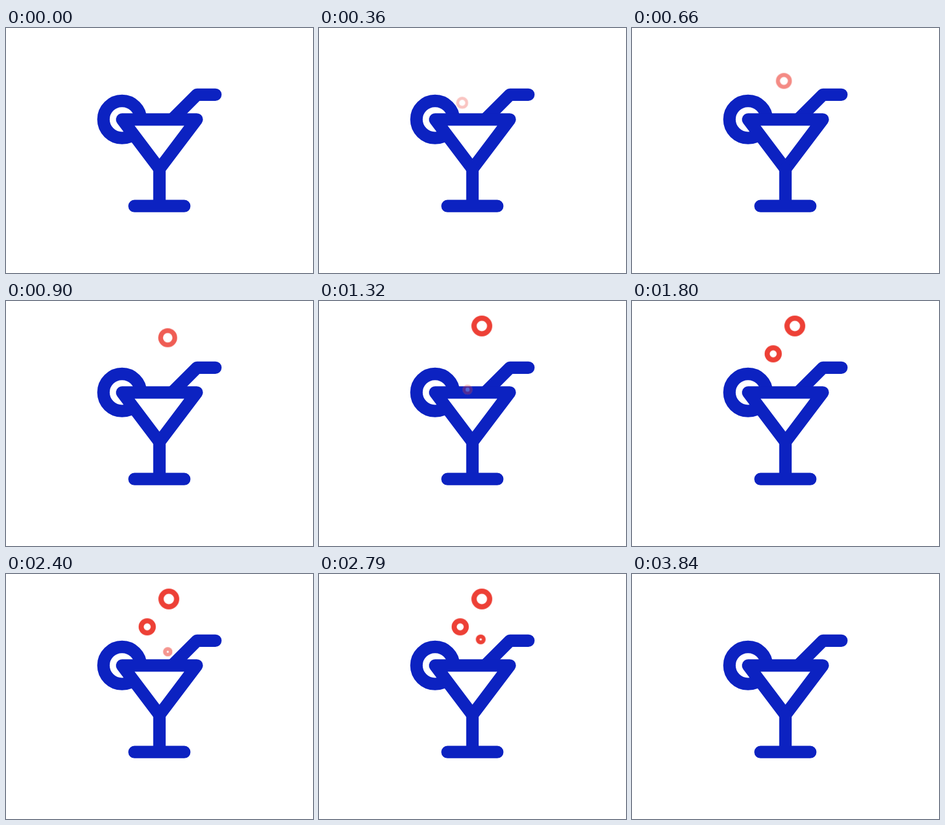
Recreate the animation shown at these times as an HTML page. Size 500 by 400 pixels, loop 4.5 s.

```html
<!DOCTYPE html>
<html lang="en">
<head>
<meta charset="utf-8">
<title>Sparkling cocktail</title>
<style>
  html, body {
    margin: 0;
    width: 100%;
    height: 100%;
    overflow: hidden;
    background: #fff;
  }

  .stage {
    position: relative;
    width: 500px;
    height: 400px;
    overflow: hidden;
  }

  svg { display: block; }

  .glass {
    fill: none;
    stroke: #0c22c1;
    stroke-width: 20.3;
    stroke-linecap: round;
    stroke-linejoin: round;
  }

  .bubble {
    position: absolute;
    left: 0;
    top: 0;
    width: var(--size);
    height: var(--size);
    border-radius: 50%;
    background: #fff;
    box-shadow: inset 0 0 0 var(--ring) #ed4036;
    offset-rotate: 0deg;
    opacity: 0;
    animation: 4500ms infinite;
  }

  .large {
    --size: 34px;
    --ring: 8.5px;
    --start-scale: .4;
    offset-path: path("M238 160 C229 140 230 112 248 85.5 C261 67 267 59 265.2 40.8");
    animation-name: rise-large;
  }

  .medium {
    --size: 28px;
    --ring: 8.3px;
    --start-scale: .4;
    offset-path: path("M236 169 C239 162 246 156 242 145 C239 132 235 116 230 86.3");
    animation-name: rise-medium;
  }

  .small {
    --size: 16.4px;
    --ring: 6.2px;
    --start-scale: .9;
    offset-path: path("M256 148 C254 138 270 140 264 128.5 C262 123 263 115 263.6 107");
    animation-name: rise-small;
  }

  /* Each bubble rises in 30 ms steps, rests, then pops at once. */
  @keyframes rise-large {
    0%, 1.3333% {
      offset-distance: 0%;
      transform: scale(var(--start-scale));
      opacity: 0;
      animation-timing-function: steps(33);
    }
    23.3333% {
      offset-distance: 100%;
      transform: scale(1);
      opacity: 1;
      animation-timing-function: step-end;
    }
    69.3333%, 100% { offset-distance: 100%; transform: scale(1); opacity: 0; }
  }

  @keyframes rise-medium {
    0%, 24.6667% {
      offset-distance: 0%;
      transform: scale(var(--start-scale));
      opacity: 0;
      animation-timing-function: steps(23);
    }
    40% {
      offset-distance: 100%;
      transform: scale(1);
      opacity: 1;
      animation-timing-function: step-end;
    }
    73.3333%, 100% { offset-distance: 100%; transform: scale(1); opacity: 0; }
  }

  @keyframes rise-small {
    0%, 42.6667% {
      offset-distance: 0%;
      transform: scale(var(--start-scale));
      opacity: 0;
      animation-timing-function: steps(29);
    }
    62% {
      offset-distance: 100%;
      transform: scale(1);
      opacity: 1;
      animation-timing-function: step-end;
    }
    85.3333%, 100% { offset-distance: 100%; transform: scale(1); opacity: 0; }
  }
</style>
</head>
<body>
<div class="stage">
  <svg class="glass" width="500" height="400" viewBox="0 0 500 400">
    <circle cx="189" cy="149.3" r="30.3"/>
    <path d="M271 149 L311 108.8 H341"/>
    <path fill="#fff" d="M189.2 149.3 H310.6 L249.9 230 Z"/>
    <path d="M249.9 230 V290.7 M209.3 290.7 H290.3"/>
  </svg>
  <div class="bubble large"></div>
  <div class="bubble medium"></div>
  <div class="bubble small"></div>
</div>
</body>
</html>
```
